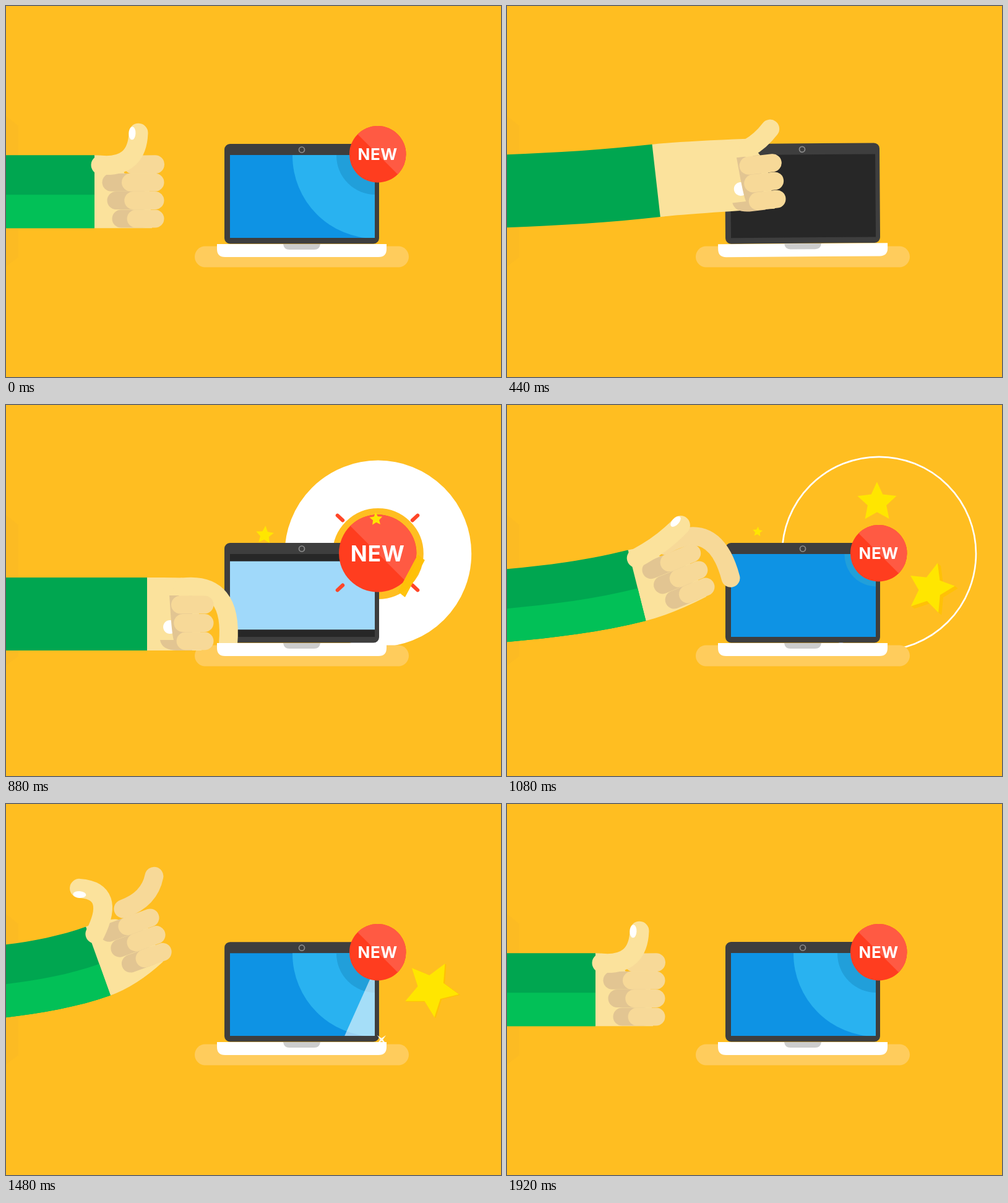
Animation of 800x600 px, one loop 1.96 s. Source, as an HTML page:

```html
<!DOCTYPE html>
<html lang="en">
<head>
<meta charset="utf-8">
<title>New laptop</title>
<style>
html, body { margin: 0; width: 100%; height: 100%; overflow: hidden; background: #ffbe21; }
svg { display: block; width: 100vw; height: 100vh; }
text { font: 700 26px Inter, "Open Sans", sans-serif; letter-spacing: .6px; text-anchor: middle; fill: #fff; }
</style>
</head>
<body>
<svg id="stage" viewBox="0 0 800 600"></svg>
<script>
const LOOP = 1960, STEP = 40;
const C = {
  sleeve: '#00a650', sleeveLight: '#02c057', skin: '#fbe29c', finger: '#f7d998', crease: '#e2c592',
  lid: '#3e3e3e', off: '#272727', star: '#ffe600', starSide: '#ffc107'
};

// Timing helpers
const RAD = Math.PI / 180;
const lerp = (a, b, p) => Array.isArray(a) ? a.map((v, i) => lerp(v, b[i], p)) : a + (b - a) * p;
const progress = (t, from, to) => Math.min(1, Math.max(0, (t - from) / (to - from)));
const smooth = p => p * p * (3 - 2 * p);
const ease = (t, from, to) => smooth(progress(t, from, to));
const rise = (t, from, tau) => t < from ? 0 : 1 - Math.exp((from - t) / tau);
const bump = (t, from, to) => Math.sin(Math.PI * progress(t, from, to));
const wobble = (t, from, half, tau) => t < from ? 1 : Math.exp((from - t) / tau) * Math.cos(Math.PI * (t - from) / half);
const kick = (t, from, half, tau) => t < from ? 0 : Math.exp((from - t) / tau) * Math.sin(Math.PI * (t - from) / half);

// Geometry and SVG helpers
function turn(x, y, deg) {
  const c = Math.cos(deg * RAD), s = Math.sin(deg * RAD);
  return [x * c - y * s, x * s + y * c];
}
const add = (p, q) => [p[0] + q[0], p[1] + q[1]];
const frame = ([x, y, a]) => (dx, dy) => add([x, y], turn(dx, dy, a));
const mix = (a, b, p) => `rgb(${lerp(a, b, p).map(Math.round)})`;
const path = (d, fill, more = '') => `<path d="${d}" fill="${fill}" ${more}/>`;
const line = (d, color, w) => path(d, 'none', `stroke="${color}" stroke-width="${w}" stroke-linecap="round"`);
const rect = (x, y, w, h, fill, more = '') => `<rect x="${x}" y="${y}" width="${w}" height="${h}" fill="${fill}" ${more}/>`;
const disc = (x, y, r, fill, more = '') => `<circle cx="${x}" cy="${y}" r="${r}" fill="${fill}" ${more}/>`;
const group = (tf, body) => `<g transform="${tf}">${body}</g>`;
const at = ([x, y, a], body) => group(`translate(${x} ${y}) rotate(${a})`, body);

// Pose: wrist [x, y, angle], fist [x, y, angle], then bend and tip of the index
// finger (in the fist's frame) and of the thumb (in the wrist's frame).
const CURLED = [[-18, -29], [0, -29]];
const TUCKED = [[56, -54], [92, -77]];
const GRIP = [[327, 301, 0], [601, 286, 0], CURLED, TUCKED];
const POINT = [[170, 267, -11.8], [287, 227, -12], [[-13, -44], [4, -77]], TUCKED];
const PRESS = [[228, 338, 0], [321, 323, 0], [[47, -38], [38, 63]], TUCKED];
const TAP = [[195, 253, -26], [280, 170, -41], [[64, -43], [47, 59]], TUCKED];
const FLICK = [[149, 254, -19.7], [233, 184, -20], [[9, -28], [29, -61]], [[66, -97], [11, -121]]];
const LIKE = [[143, 300, 0], [241, 285, 0], CURLED, [[69, -38], [71, -95]]];

const MOVES = [[270, GRIP], [590, POINT], [620, POINT], [790, PRESS], [900, PRESS],
  [1240, TAP], [1480, FLICK], [1760, LIKE]];

function poseAt(t) {
  const next = MOVES.findIndex(([time]) => t < time);
  if (next < 0) return LIKE;
  if (!next) return GRIP;
  const [from, a] = MOVES[next - 1], [to, b] = MOVES[next];
  return lerp(a, b, ease(t, from, to));
}

// Bent strip from the stage edge to the wrist
function sleeve(wrist, from, to, color) {
  const [x, y, a] = wrist;
  const startY = y - x * Math.tan(a * .62 * RAD);
  const edge = off => {
    const end = frame(wrist)(0, off), h = end[0] / 3;
    return [[0, startY + off], [h, startY + off + h * Math.tan(a * .35 * RAD)], add(end, turn(-h, 0, a)), end];
  };
  const u = edge(from), v = edge(to);
  return path(`M${u[0]}C${u[1]} ${u[2]} ${u[3]}L${v[3]}C${v[2]} ${v[1]} ${v[0]}Z`, color);
}

const bent = (base, [bend, tip], color, w) => line(`M${base}Q${bend} ${tip}`, color, w);
const indexFinger = (index, color) => bent([-36, -28.5], index, color, 30);
const knuckles = (color, start, step, end) =>
  [0, 1, 2].map(i => line(`M${start + step * i},${i * 29.4}H${end}`, color, 29)).join('');

function thumb([bend, tip]) {
  const angle = Math.atan2(tip[1] - bend[1], tip[0] - bend[0]) / RAD;
  return bent([10, -43], [bend, tip], C.skin, 31) +
    at([...tip, angle], '<ellipse cx="-1" cy="-10" rx="10.5" ry="5.5" fill="#fff"/>');
}

function arm([wrist, fist, index, thumbCurve], front) {
  const w = frame(wrist), f = frame(fist);
  const top = front ? f(-50, -15) : add(f(-36, -28.5), turn(0, -15, wrist[2]));
  const palm = `M${w(-1, -59)}Q${w(45, -59)} ${top}L${f(-10, 0)}L${f(-5, 74)}Q${w(45, 59)} ${w(-1, 59)}Z`;
  const crease = front
    ? knuckles(C.crease, -71, 8, -20)
    : disc(-56, 36, 11, '#fff') +
      path('M-57-15H-20V74H-46C-62 73-70 68-72 57H-50C-54 40-55 10-57-15Z', C.crease);
  return path(palm, C.skin) +
    sleeve(wrist, -59, 59, C.sleeve) + (front ? sleeve(wrist, 5, 59, C.sleeveLight) : '') +
    at(fist, crease + indexFinger(index, front ? C.finger : C.skin) + knuckles(C.finger, -39.5, 4.3, 0)) +
    (front ? at(wrist, thumb(thumbCurve)) : '');
}

const gripArm = ([wrist]) =>
  rect(wrist[0], wrist[1] - 58, 250, 116, C.skin) + sleeve(wrist, -58, 58, C.sleeve);
function gripFingers([, fist, index]) {
  const fingers = color => at(fist, indexFinger(index, color) + knuckles(color, -38, 4.5, 0));
  return group('translate(-6 4)', fingers('#2b2b2b')) + fingers(C.finger);
}

// Laptop
function screen(t, dip) {
  const y = 241 + dip * .67, h = 375 - y, open = progress(t, 800, 897);
  const glint = 324 + (t - 1240) * 1.18;
  let s = rect(362, y, 234, h, C.off);
  if (!open) return s;
  s += rect(362, y + h * (1 - open) / 2, 234, h * open, mix([160, 217, 250], [14, 147, 228], ease(t, 890, 1000)));
  s += `<clipPath id="screen"><rect x="362" y="${y}" width="234" height="${h}"/></clipPath>`;
  s += '<clipPath id="glass"><rect x="362" y="241" width="234" height="134"/></clipPath>';
  s += `<g clip-path="url(#screen)">${disc(597, 242, 134 * ease(t, 920, 1340), '#29b2f0')}` +
    `${disc(597, 242, 63 * ease(t, 920, 1140), '#219fda')}</g>`;
  if (t > 1180 && glint < 660)
    s += path(`M${glint} 241h60l-60 134h-60Z`, '#fff', 'opacity=".58" clip-path="url(#glass)"');
  return s;
}
const lid = (t, dip) =>
  path(`M${362 + dip / 2} ${232 + dip * .8}H${594 - dip / 2}L594 ${375.5 - dip * .25}H362Z`, C.lid,
    `stroke="${C.lid}" stroke-width="18" stroke-linejoin="round"`) +
  screen(t, dip) +
  disc(478, 232.5 + dip * .7, 4.5, 'none', 'stroke="#8c8c8c" stroke-width="1.7"');
const base = dip => group(`translate(0 ${-dip * .25})`,
  path('M341 385H615V393Q615 406 602 406H354Q341 406 341 393Z', '#fff') +
  path('M448 385H508Q507 394 498 394H458Q449 394 448 385Z', '#ccc'));

// Stars, sparkles and burst
function starPath(points, R, r, from = -90) {
  return 'M' + Array.from({ length: points * 2 }, (_, i) =>
    turn(i % 2 ? r : R, 0, from + i * 180 / points)).join('L') + 'Z';
}
const star = ([x, y], R, rot) => at([x, y, rot], path(starPath(5, R, R * .48), C.star));
const sparkle = (x, y, R, rot) => at([x, y, rot], path(starPath(4, R, R * .22), '#fffaea'));

function spinningStar(t) {
  const size = (36 * ease(t, 820, 880) + 8 * ease(t, 880, 1240)) * (1 - ease(t, 1700, 1800));
  if (!size) return '';
  const [x, y] = lerp([601, 240], [687, 299], rise(t, 820, 75));
  const spin = (12 - 462 * (1 - rise(t, 880, 200)) / (1 + ease(t, 880, 1240) * .05)) * RAD;
  const face = Math.cos(spin), depth = Math.abs(Math.sin(spin)) * 14;
  const layer = (dx, color) => group(`translate(${dx} ${dx * .2}) scale(${face} 1)`,
    path(starPath(5, size, size * .48, 65), color, `stroke="${color}" stroke-width="2" vector-effect="non-scaling-stroke"`));
  let s = '';
  for (let i = 8; i > 0; i--) s += layer(depth * i / 8, C.starSide);
  const flat = Math.abs(face) > .1 ? layer(0, C.star) : '';
  return at([x, y, 28 - 10 * ease(t, 880, 1480)], s + flat);
}

function burst(t) {
  const outer = 158 * rise(t, 790, 29), inner = 170 * rise(t, 820, 106);
  return outer > inner
    ? disc(601.3, 240.5, (outer + inner) / 2, 'none', `stroke="#fff" stroke-width="${outer - inner}"`) : '';
}
function rays(t) {
  const p = progress(t, 820, 1000), inner = 63 + 42 * p, length = 18 * bump(t, 790, 1000) - 6;
  if (!p || length <= 0) return '';
  const ray = at([0, 0, 43], line(`M${inner} 0h${length}`, '#ff4628', 6));
  return [-1, 1].map(x => [-1, 1].map(y => group(`translate(600.5 239) scale(${x} ${y})`, ray)).join('')).join('');
}
function badge(t) {
  if (t <= 800) return '';
  return group(`translate(600.7 239.8) scale(${1 - wobble(t, 800, 80, 80)})`,
    disc(0, 0, 45.8, '#ff3d1f') + path('M-32.4-32.4A45.8 45.8 0 0 1 32.4 32.4Z', '#ff5a43') +
    '<text y="9.6">NEW</text>');
}
function flyingStars(t) {
  const up = ease(t, 820, 1120), leave = progress(t, 1240, 1400);
  const left = lerp([478, 235], [405, 205], rise(t, 820, 35));
  return star(left, 16 * ease(t, 820, 890) * (1 - .88 * ease(t, 900, 1240)) * (1 - progress(t, 1240, 1270)), 5) +
    star([598, 185 - 36 * ease(t, 860, 1180) - 200 * leave ** 2], 34 * Math.sqrt(up) * (1 - .15 * leave), -4 * (1 - up));
}

function draw(t) {
  if (t < STEP) t = LOOP - STEP;
  const pose = poseAt(t), gripping = t < 280, behind = t < 440;
  const slide = -620 * (1 - ease(t, 40, 240));
  const sway = wobble(t, 240, 90, 100), dip = 14 * kick(t, 1170, 110, 90);
  const bob = 30 * bump(t, 1090, 1235) + 14 * kick(t, 1720, 70, 60);
  const hand = body => group(`translate(${slide} ${bob})`, body);
  const laptop = body => group(`translate(${slide + 2.5 * sway} ${3 * sway}) rotate(${-4 * sway} 341 405)`, body);

  let s = rect(0, 0, 800, 600, '#ffbe21') + path('M0 178L20 194V406L0 421Z', '#fcbb23') + burst(t);
  s += group(`translate(478 405.5) scale(${ease(t, 60, 220)})`, rect(-173, -17, 346, 34, '#ffcc5c', 'rx="17"'));
  if (behind) s += hand(gripping ? gripArm(pose) : arm(pose, false));
  s += laptop(lid(t, dip));
  if (!behind) s += hand(arm(pose, t >= 1020));
  s += sparkle(364, 228, 15 * bump(t, 1170, 1310), 8) + sparkle(607, 381, 10 * bump(t, 1410, 1550), 45);
  s += laptop(base(dip));
  if (gripping) s += hand(gripFingers(pose));
  stage.innerHTML = s + rays(t) + badge(t) + spinningStar(t) + flyingStars(t);
}

const stage = document.getElementById('stage');
const start = performance.now();
function tick() {
  const t = (performance.now() - start) % LOOP;
  draw(Math.floor(t / STEP) * STEP);
  requestAnimationFrame(tick);
}
tick();
</script>
</body>
</html>
```
